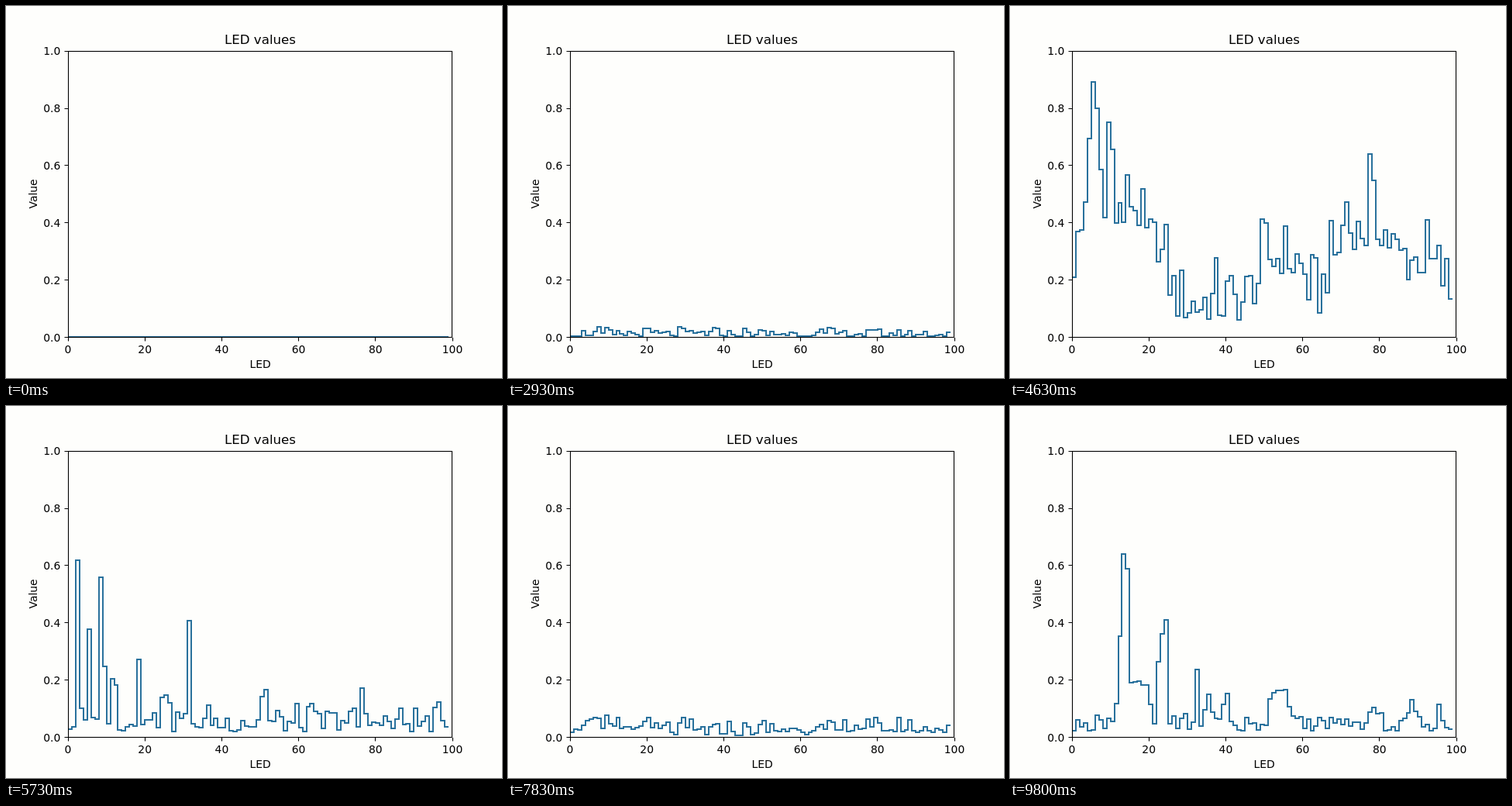
An HTML page that plays this animation: 640 by 480 pixels, repeating every 9830 ms.

```html
<!DOCTYPE html>
<html lang="en">
<head>
<meta charset="utf-8">
<title>LED values</title>
<style>
  html, body { margin: 0; width: 100%; height: 100%; overflow: hidden; background: #fefefc; }
  svg { display: block; width: 640px; height: 480px; }
  text { font: 13.89px "DejaVu Sans", sans-serif; text-anchor: middle; fill: #000; }
  .title { font-size: 16.67px; }
  .y { text-anchor: end; }
  .axis { fill: none; stroke: #000; stroke-width: 1.1; }
  #line { fill: none; stroke: #29719c; stroke-width: 2; }
</style>
</head>
<body>
<svg viewBox="0 0 640 480">
  <clipPath id="area"><rect x="80" y="57.6" width="496" height="369.6"/></clipPath>
  <g clip-path="url(#area)"><path id="line"/></g>
  <path id="ticks" class="axis"/>
  <rect class="axis" x="80.5" y="58.5" width="495" height="369"/>
  <g id="labels"></g>
  <text class="title" x="328" y="49">LED values</text>
  <text x="328" y="467">LED</text>
  <text transform="translate(39.5 242.4) rotate(-90)">Value</text>
</svg>
<script>
const LOOP = 9830, BARS = 99, BAR_OF_MUSIC = 44.5;
const byId = id => document.getElementById(id);
const clamp = v => Math.min(1, Math.max(0, v));
const px = v => 80 + 4.96 * v;
const py = v => 427.2 - 369.6 * v;

function drawAxes() {
  let d = '', labels = '';
  for (let k = 0; k <= 5; k++) {
    const x = px(20 * k), y = py(k / 5);
    d += `M${Math.floor(x) + .5} 428v4.5M80 ${Math.round(y) + .5}h-4.5`;
    labels += `<text x="${x}" y="448">${20 * k}</text>` +
      `<text class="y" x="70.3" y="${Math.round(y + 5.3)}">${(k / 5).toFixed(1)}</text>`;
  }
  byId('ticks').setAttribute('d', d);
  byId('labels').innerHTML = labels;
}

const rnd = (a, b) => {
  const s = Math.sin(a * 12.9898 + b * 78.233) * 43758.5453;
  return s - Math.floor(s);
};

// A noisy floor with flat-topped bumps: [centre, height, half width]
const spectrum = (seed, low, span, ...bumps) =>
  Array.from({ length: BARS }, (_, i) =>
    bumps.reduce((sum, [c, h, w]) => sum + h * Math.exp(-(((i - c) / w) ** 4)),
      low + span * rnd(i, seed) ** 2));

const snare = spectrum(1, .06, .22,
  [5.2, .38, 2], [8, .28, 9], [9.5, .4, .8], [19, .2, 6], [54, .16, 7],
  [74, .25, 8], [88, .15, 9], [71, .14, .5], [77, .14, .5]);
const kick = spectrum(2, .02, .2, [6, .72, 3], [12, .25, 6]);
const pluck = spectrum(3, .02, .1,
  [2, .57, .5], [5, .26, .5], [8, .44, .5], [9, .24, .5], [11.5, .14, .8],
  [18, .25, .5], [24.5, .14, .8], [31, .3, .5], [50.5, .14, .8], [76, .13, .5]);
const chord = spectrum(4, .02, .06,
  [13.2, .44, 1.3], [15.5, .16, 4.5], [23.5, .4, .8], [22, .2, .5], [32, .16, .5],
  [35, .1, 1], [39.5, .1, .8], [53.5, .14, 3], [78, .07, 2], [88, .07, 1.5], [95, .09, .8]);
const calm = spectrum(5, .003, .03);

// Times are counted in steps of a thirtieth of a second
const hits = [];
const hit = (time, shape) => {
  const at = Math.round(time);
  hits.push({ at, bars: shape.map((v, i) => v * (.94 + .12 * rnd(at, i))) });
};

for (let k = 0; k < 7; k++) {
  hit(5.5 + BAR_OF_MUSIC * k, snare);
  if (k < 6) hit(28 + BAR_OF_MUSIC * k, kick);
}
for (const t of [17, 61, 128, 172, 239, 266]) hit(t, pluck);
for (const t of [39, 106, 150, 217, 283, 294]) hit(t, chord);

const shimmer = (n, i, age) => 1 + .5 * clamp(age / 6) * (rnd(n, i) - .5);

function level(i, n) {
  let v = calm[i] * Math.min(2, n / 88) * shimmer(n, i, 6);
  for (const { at, bars } of hits) {
    const age = n - at;
    if (age < -1 || age > 30) continue;
    const env = age < 0 ? .45 : Math.exp(-age / 2.7);
    v = Math.max(v, bars[i] * env * shimmer(n, i, age));
  }
  return v;
}

function draw(n) {
  let d = '';
  for (let i = 0; i < BARS; i++) {
    const y = Math.round(py(level(i, n)));
    d += (i ? 'V' + y : 'M80 ' + y) + 'H' + Math.round(px(i + 1));
  }
  byId('line').setAttribute('d', d);
}

let start, last = -1;
function tick(now) {
  start ??= now;
  const t = Math.max(0, now - start) % LOOP;
  const n = Math.floor((Math.floor(t / 10) * 3 + 1) / 10);
  if (n !== last) draw(last = n);
  requestAnimationFrame(tick);
}

drawAxes();
requestAnimationFrame(tick);
</script>
</body>
</html>
```
